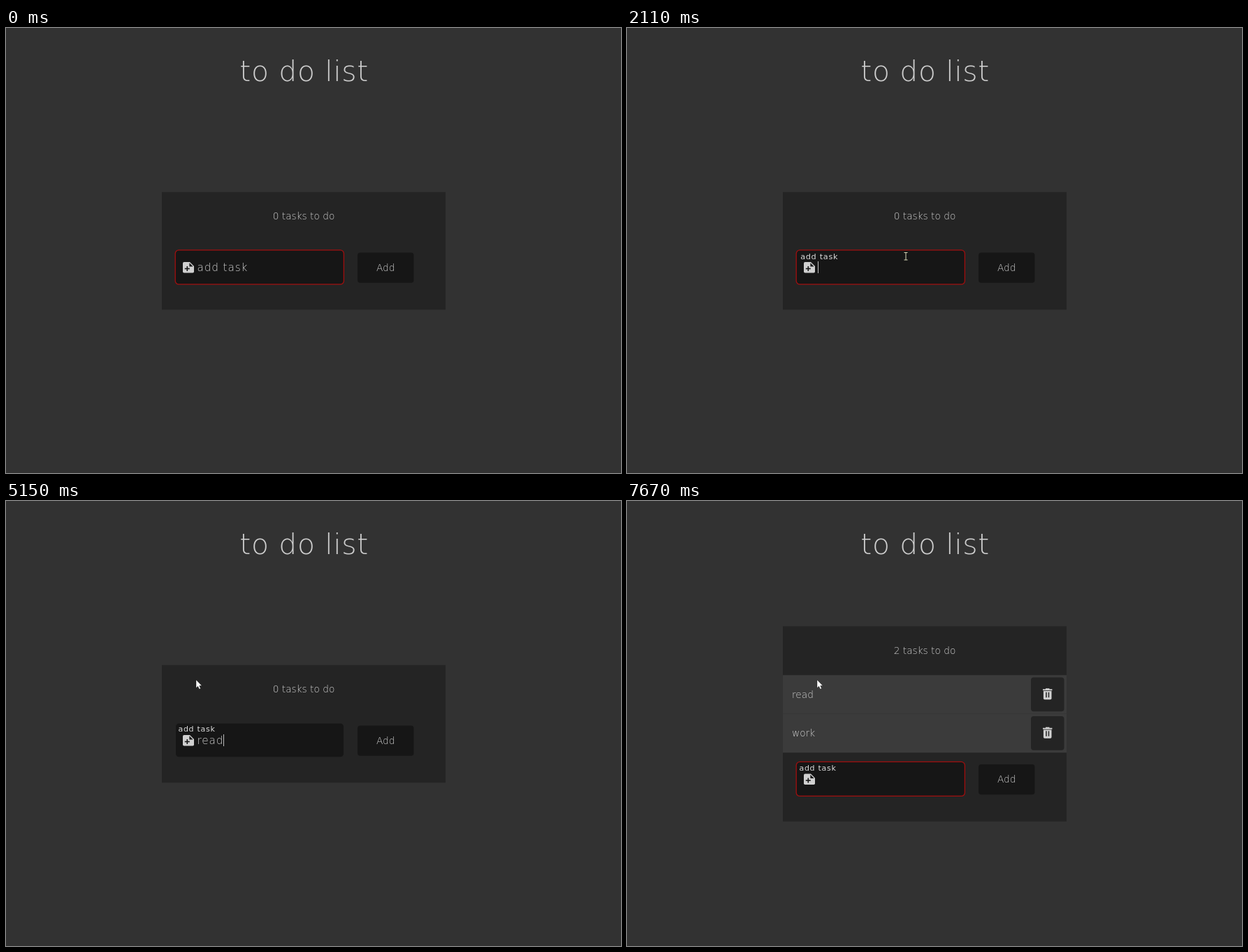
An HTML page with a canvas for the animation above (8 s loop, 880 px wide and 637 px high).

```html
<!DOCTYPE html>
<html lang="en">
<head>
<meta charset="utf-8">
<title>to do list</title>
<style>
  html, body { margin: 0; width: 100%; height: 100%; overflow: hidden; background: #323232; }
  canvas { display: block; }
</style>
</head>
<body>
<canvas id="stage" width="880" height="637"></canvas>
<script>
const ctx = document.getElementById('stage').getContext('2d');
const LOOP = 8000;
const ROW = 55.5;
const TEXT = '#d0d0d0';
const PANEL = '#242424';
const FIELD = '#161616';

// Pointer path: [time, x, y]
const pointerPath = [
  [330, 776, 604], [430, 672, 508], [540, 623, 467], [900, 623, 467],
  [980, 578, 405], [1070, 539, 368], [1230, 480, 376], [1380, 440, 367],
  [1600, 399, 326.5], [2380, 399, 326.5], [2470, 318, 318], [2610, 272, 256]
];
const keystrokes = [
  [4750, 'r'], [4880, 're'], [5010, 'rea'], [5150, 'read'], [5380, ''],
  [6860, 'w'], [6990, 'wo'], [7130, 'wor'], [7210, 'work'], [7380, '']
];
const submissions = [[5380, 'read'], [7380, 'work']];
const caretToggles = [1880, 2390, 2900, 3440, 3960, 4470, 4750, 5590, 6070, 6580, 6860, 7670];
const borderFades = [[4750, 0], [5380, 1], [6860, 0], [7380, 1]];

const clamp = v => Math.min(1, Math.max(0, v));
const ease = v => v * v * (3 - 2 * v);
const mix = (a, b, k) => a + (b - a) * k;
const last = (list, t) => list.filter(item => item[0] <= t).pop();

function box(x, y, w, h, color, radius = 0) {
  ctx.fillStyle = color;
  ctx.beginPath();
  ctx.roundRect(x, y, w, h, radius);
  ctx.fill();
}

function shape(points, color) {
  ctx.fillStyle = color;
  ctx.beginPath();
  points.forEach(([x, y]) => ctx.lineTo(x, y));
  ctx.closePath();
  ctx.fill();
}

function write(text, x, y, size, { spacing = 0, align = 'left', weight = 200, color = TEXT } = {}) {
  ctx.font = `${weight} ${size}px "DejaVu Sans", sans-serif`;
  ctx.letterSpacing = spacing + 'px';
  ctx.textAlign = align;
  ctx.fillStyle = color;
  ctx.fillText(text, x, y);
  return ctx.measureText(text).width;
}

function at(x, y, draw) {
  ctx.save();
  ctx.translate(x, y);
  draw();
  ctx.restore();
}

function noteIcon() {
  ctx.fillStyle = TEXT;
  ctx.beginPath();
  ctx.moveTo(1.8, 0);
  ctx.lineTo(10, 0);
  ctx.lineTo(16, 5.8);
  ctx.arcTo(16, 15.5, 8, 15.5, 1.8);
  ctx.arcTo(0, 15.5, 0, 8, 1.8);
  ctx.arcTo(0, 0, 8, 0, 1.8);
  ctx.fill();
  shape([[9.4, 1.2], [14.6, 6.3], [9.4, 6.3]], FIELD);
  box(2.8, 8.6, 7, 1.6, FIELD);
  box(5.5, 5.9, 1.6, 7, FIELD);
}

function trashIcon() {
  box(4, 0, 5.4, 2, TEXT);
  box(0, 1.1, 13.4, 1.9, TEXT);
  box(0.9, 3.7, 11.6, 12.3, TEXT, [0, 0, 1.8, 1.8]);
  box(4.2, 5.6, 1.5, 7.4, PANEL);
  box(7.7, 5.6, 1.5, 7.4, PANEL);
}

function drawRow(text, y) {
  box(223, y, 406, ROW + 0.1, '#3b3b3b');
  write(text, 236, y + 32.3, 13.7);
  box(578, y + 3.3, 47.5, 48.7, PANEL, 4);
  at(595, y + 19, trashIcon);
}

function borderAlpha(t) {
  const change = last(borderFades, t);
  return change ? mix(1 - change[1], change[1], ease(clamp((t - change[0]) / 200))) : 1;
}

function drawField(t, y) {
  box(243, y + 1, 240, 47.8, FIELD, 4.5);
  ctx.strokeStyle = `rgba(160, 14, 14, ${borderAlpha(t)})`;
  ctx.lineWidth = 1.3;
  ctx.beginPath();
  ctx.roundRect(242.2, y + 0.4, 241.2, 49, 5);
  ctx.stroke();
  at(253, y + 17.6, noteIcon);

  const lift = ease(clamp((t - 1890) / 260));
  write('add task', mix(273.5, 246.5, lift), y + mix(30.5, 12.5, lift), mix(15.3, 11, lift),
    { spacing: mix(0.85, 0.7, lift), weight: lift > 0.5 ? 400 : 200, color: lift > 0.5 ? '#dcdcdc' : TEXT });

  const typed = (last(keystrokes, t) || [0, ''])[1];
  const width = write(typed, 273.5, y + 30.5, 15.3, { spacing: 0.85 });
  if (caretToggles.filter(time => time <= t).length % 2)
    box(Math.round(273 + width), y + 16.5, 1, 17, '#bdbdbd');
}

function drawPointer(t) {
  const from = last(pointerPath, t);
  if (!from) return;
  const to = pointerPath[pointerPath.indexOf(from) + 1] || from;
  const k = to === from ? 0 : (t - from[0]) / (to[0] - from[0]);
  const x = mix(from[1], to[1], k), y = mix(from[2], to[2], k);
  const overField = t < 2610 && x > 242 && x < 484 && y > 317.5 && y < 367;

  if (t >= 1800 && t < 1980) box(387, 315.8, 20.4, 20.4, '#83830f', 10.2);
  at(x, y, () => {
    if (overField) {
      box(-0.5, -5, 1, 10.5, '#d8d8b8');
      box(-2.5, -5.5, 5, 1, '#d8d8b8');
      box(-2.5, 5, 5, 1, '#d8d8b8');
    } else {
      const arrow = [[0, 0], [0, 11.6], [2.6, 9.2], [4.5, 13.3], [6.5, 12.4], [4.7, 8.5], [8.1, 8.2]];
      shape(arrow, '#fff');
      ctx.strokeStyle = 'rgba(0, 0, 0, 0.6)';
      ctx.lineWidth = 0.6;
      ctx.stroke();
    }
  });
}

function draw(t) {
  const tasks = submissions.filter(([time]) => time <= t);
  const height = 168.6 + ROW * tasks.length;
  const top = 319 - height / 2;
  const fieldTop = top + height - 85.8;

  box(0, 0, 880, 637, '#323232');
  write('to do list', 426.6, 76, 40.8, { spacing: 0.7, align: 'center', color: '#cecece' });
  box(223, top, 406, height, PANEL);
  write(`${tasks.length} tasks to do`, 426, top + 39.5, 13.7, { align: 'center' });
  tasks.forEach(([, text], i) => drawRow(text, top + 70 + ROW * i));
  drawField(t, fieldTop);
  box(503, fieldTop + 4, 80.5, 43.2, FIELD, 4);
  write('Add', 543.2, fieldTop + 30.4, 13.7, { align: 'center' });
  drawPointer(t);
}

const start = performance.now();
function frame() {
  draw((performance.now() - start) % LOOP);
  requestAnimationFrame(frame);
}
frame();
</script>
</body>
</html>
```
